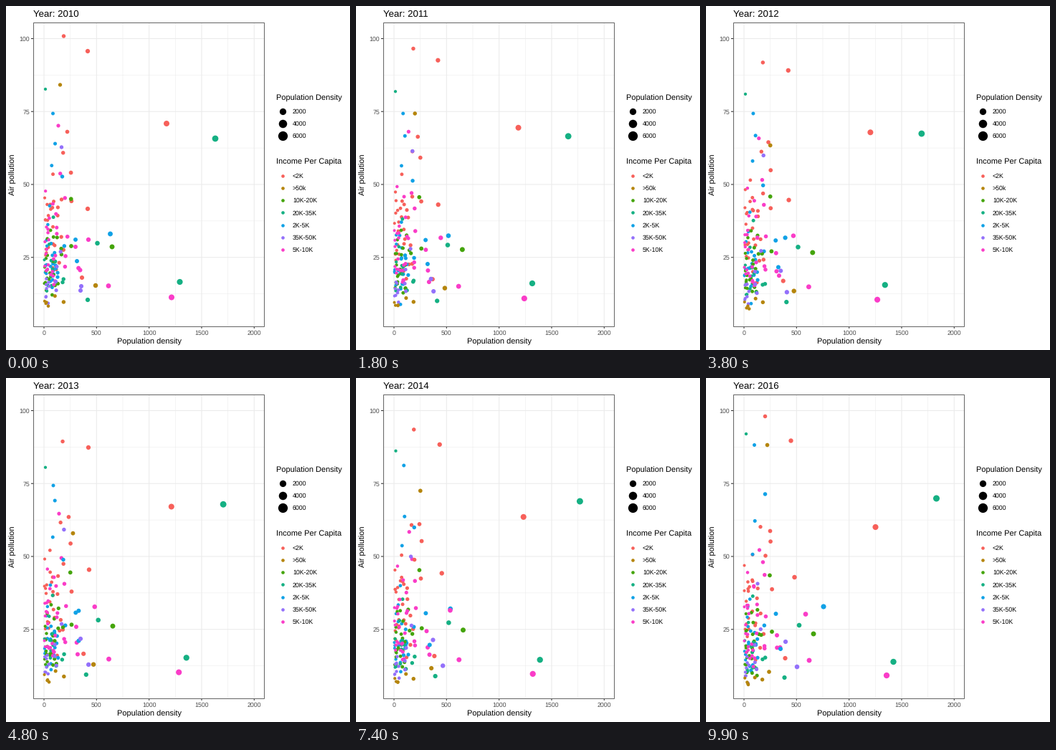
A matplotlib script for the animation above (10 s loop, 480 by 480 pixels).

```python
import numpy as np
import matplotlib.pyplot as plt
from matplotlib.animation import FuncAnimation
from matplotlib.patches import Rectangle

SIZE, FRAMES, YEARS = 480, 100, 7
PT = 0.72  # points per pixel at 100 dpi
INK, GREY, RULE = "black", "#4d4d4d", "#333333"
COLORS = {
    "<2K": "#f7605a", ">50k": "#b5850c", "10K-20K": "#44a40a",
    "20K-35K": "#15b083", "2K-5K": "#10a1e6", "35K-50K": "#9370fb",
    "5K-10K": "#fa3cc8",
}
LEFT, TOP, RIGHT, BOTTOM = 38, 23, 360, 447

plt.rcParams["font.family"] = "Liberation Sans"
plt.rcParams["text.hinting"] = "none"
rng = np.random.default_rng(12)


def px(density):
    return 53 + 0.14665 * density


def py(level):
    return 452.5 - 4.07 * level


def radius(density):
    return 1.9 + 0.061 * np.sqrt(np.maximum(density, 0))


# ---------- data: yearly positions on the stage ----------
# Dots that stand apart: a few points, evenly spaced over the years.
PATHS = {
    "<2K": [
        [(224, 164), (231, 180), (236.5, 208)],
        [(114, 63), (115, 98), (118.5, 87.5)],
        [(80.5, 42), (79, 90), (82.5, 53.5)],
        [(114, 283), (116, 267), (123.5, 278)],
        [(85.5, 175.5), (89.5, 213.5)],
        [(77.5, 270), (83, 248)],
        [(106, 379), (110.5, 391)],
    ],
    ">50k": [
        [(75.5, 110), (94, 220), (85.5, 93.5)],
        [(125, 390), (122, 400), (88, 410)],
    ],
    "10K-20K": [
        [(148, 336), (150, 357)],
        [(91, 335), (92, 354)],
    ],
    "20K-35K": [
        [(292, 185), (303.5, 176), (321.5, 168)],
        [(242.5, 385), (261.5, 396)],
        [(127.5, 331), (130, 345)],
        [(114, 410), (109.5, 418)],
        [(55, 116), (55, 125), (56, 78)],
    ],
    "2K-5K": [
        [(145.5, 318), (100, 325), (164, 319)],
        [(65.5, 150), (66, 150), (67.5, 93.5)],
        [(78.5, 238), (80, 254), (82.5, 162)],
        [(97, 326), (97.5, 329)],
        [(99, 356), (104, 378)],
    ],
    "35K-50K": [
        [(77.5, 197), (81, 212), (72, 287)],
        [(105, 391), (104, 363), (111, 368)],
        [(104, 397), (127, 403)],
    ],
    "5K-10K": [
        [(231, 406.5), (252, 415)],
        [(115, 326), (124, 319), (139, 329.5)],
        [(143, 390.5), (144, 394)],
        [(97, 336), (99, 359)],
        [(73, 167), (74, 190), (74.5, 240)],
    ],
}

# Crowd by the left edge: colour, count, lowest y, mean height above it.
CROWD = [
    ("<2K", 30, 395, 75), ("2K-5K", 26, 408, 64), ("10K-20K", 26, 412, 44),
    ("20K-35K", 13, 418, 42), ("5K-10K", 31, 400, 60),
    ("35K-50K", 12, 424, 32), (">50k", 6, 427, 14),
]

xs, ys, tints = [], [], []


def add(color, x, y):
    xs.append(x)
    ys.append(y)
    tints.append(COLORS[color])


for color, count, low, height in CROWD:
    for _ in range(count):
        x = 54 + min(rng.exponential(12), 48)
        y = low - rng.gamma(3, height / 3)
        trend = np.linspace(-3, 8, YEARS)
        wander = rng.normal(0, 1, (2, YEARS))
        add(color, np.maximum(53.5, x + wander[0]),
            np.minimum(428, y + trend + 0.1 * height * wander[1]))

for color, paths in PATHS.items():
    for path in paths:
        x, y = zip(*path)
        when = np.linspace(0, YEARS - 1, len(path))
        add(color, np.interp(range(YEARS), when, x),
            np.interp(range(YEARS), when, y))

xs, ys = np.array(xs), np.array(ys)

# ---------- stage ----------
fig = plt.figure(figsize=(4.8, 4.8), dpi=100, facecolor="white")
ax = fig.add_axes([0, 0, 1, 1])
ax.set(xlim=(0, SIZE), ylim=(SIZE, 0))
ax.axis("off")


def line(x, y, color, width):
    ax.plot(x, y, color=color, lw=width * PT, solid_capstyle="butt",
            snap=False, zorder=1)


def text(x, y, s, size, color=INK, **kw):
    kw.setdefault("va", "baseline")
    return ax.text(x, y, s, fontsize=size * PT, color=color, **kw)


def dots(x, y, r, color):
    return ax.scatter(x, y, s=(2 * PT * r) ** 2, c=color, linewidths=0,
                      snap=False, zorder=3)


for i in range(9):
    width = 0.53 if i % 2 else 1.07
    line([px(250 * i)] * 2, [TOP, BOTTOM], "#ebebeb", width)
    if i:
        line([LEFT, RIGHT], [py(12.5 * i)] * 2, "#ebebeb", width)

for d in range(0, 2001, 500):
    line([px(d)] * 2, [BOTTOM, BOTTOM + 3], RULE, 1.07)
    text(px(d), 459, str(d), 8.8, GREY, ha="center")
for v in range(25, 101, 25):
    line([LEFT - 3, LEFT], [py(v)] * 2, RULE, 1.07)
    text(33, py(v) + 3.2, str(v), 8.8, GREY, ha="right")

ax.add_patch(Rectangle((LEFT, TOP), RIGHT - LEFT, BOTTOM - TOP, fill=False,
                       ec="#6b6b6b", lw=1.07 * PT, zorder=5))
text(199.5, 472, "Population density", 11, ha="center")
text(13.5, 235.5, "Air pollution", 11, rotation=90, va="center",
     ha="right").set_x(15.5)

text(377, 132, "Population Density", 11)
for i, d in enumerate((2000, 4000, 6000)):
    y = 146.5 + 17.28 * i
    dots(386, y, radius(d), INK)
    text(400, y + 3.2, str(d), 8.8)

text(377, 221, "Income Per Capita", 11)
for i, (label, color) in enumerate(COLORS.items()):
    y = 236.5 + 17.28 * i
    dots(386, y, 2.3, color)
    text(400, y + 3.2, label, 8.8)

title = text(38, 15, "", 13.2)
cloud = dots(xs[:, 0], ys[:, 0], np.full(len(xs), 2.2), tints)


def draw(k):
    t = k * (YEARS - 1) / (FRAMES - 1)
    i = min(int(t), YEARS - 2)
    f = t - i
    x = xs[:, i] * (1 - f) + xs[:, i + 1] * f
    y = ys[:, i] * (1 - f) + ys[:, i + 1] * f
    cloud.set_offsets(np.column_stack([x, y]))
    cloud.set_sizes((2 * PT * radius((x - 53) / 0.14665)) ** 2)
    title.set_text(f"Year: {int(2010.5 + t)}")
    return cloud, title


anim = FuncAnimation(fig, draw, frames=FRAMES, interval=100, repeat=True,
                     repeat_delay=0, init_func=lambda: draw(0))
plt.show()
```
